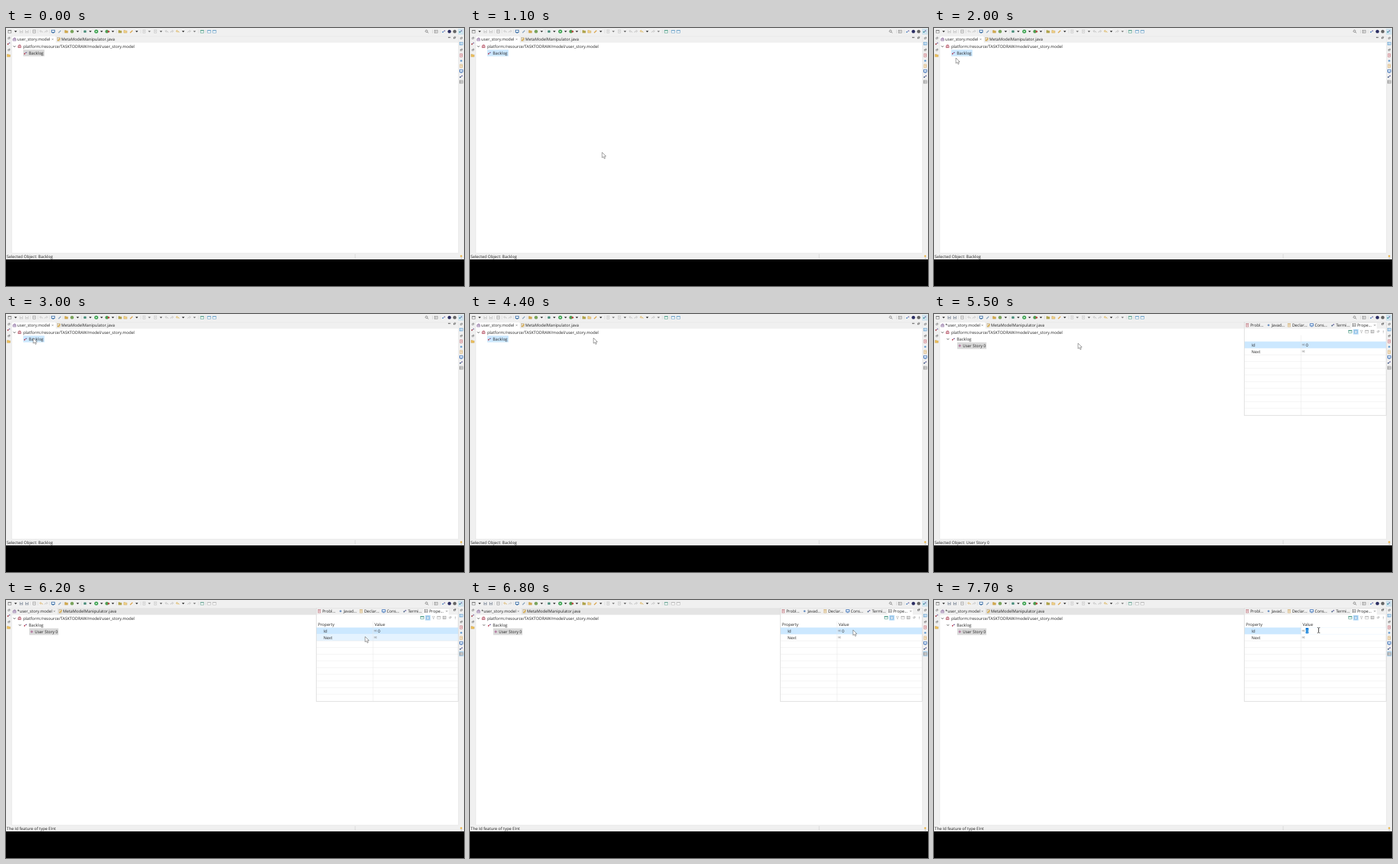
Recreate the animation shown at these times as an HTML page. Size 690x388 px, loop 8 s.

```html
<!DOCTYPE html>
<html lang="en">
<head>
<meta charset="utf-8">
<title>Model editor</title>
<style>
  html, body { margin: 0; width: 100%; height: 100%; overflow: hidden; background: #000; }
  svg { display: block; width: 100%; height: 100%; }
  text { font: 6.15px "Open Sans", "Noto Sans", sans-serif; fill: #222; text-rendering: geometricPrecision; white-space: pre; }
</style>
</head>
<body>
<svg id="stage" viewBox="0 0 690 388"></svg>
<script>
const LOOP = 8000;
const ADDED = 5300, OPENED = 5500, ACTIVE = 5600, EDIT = 7200;
const BAR = '#f0f0f0', LINE = '#e0e0e0', SELECTED = '#cce8ff', HOVER = '#e5f3ff', UNFOCUSED = '#d9d9d9';

const rect = (x, y, w, h, fill, more = '') =>
  `<rect x="${x}" y="${y}" width="${w}" height="${h}" fill="${fill}" ${more}/>`;
const path = (d, stroke, width = 0.8, fill = 'none') =>
  `<path d="${d}" stroke="${stroke}" stroke-width="${width}" fill="${fill}"/>`;
const label = (x, y, s) => `<text x="${x}" y="${y}">${s}</text>`;
const during = (from, to, body) => `<g data-from="${from}" data-to="${to}">${body}</g>`;

// Small icons, drawn around their own centre
const shapes = {
  window: c => rect(-2.6, -2.2, 5.2, 4.4, '#fff', `stroke="${c}" stroke-width=".8"`) + rect(-2.6, -2.2, 5.2, 1.3, c),
  floppy: c => rect(-2.6, -2.6, 5.2, 5.2, c) + rect(-1.5, -2.4, 3, 1.8, '#fff') + rect(-1.3, .8, 2.6, 1.6, '#eee'),
  drop: c => path('M-2.2-1.1H2.2L0 1.4Z', 'none', 0, c),
  dot: c => `<circle r="2.8" fill="${c}"/>`,
  small: c => `<circle r="1.7" fill="${c}"/>`,
  play: c => `<circle r="3.1" fill="${c}"/>` + path('M-.9-1.5L1.6 0L-.9 1.5Z', 'none', 0, '#fff'),
  bug: c => `<ellipse rx="1.8" ry="2.3" fill="${c}"/>` + path('M-2.8-1.8L2.8 1.8M2.8-1.8L-2.8 1.8M-3 0H3', c, .5),
  folder: c => path('M-2.8 2.2V-2H-.6L0-1.2H2.4V2.2Z', '#c09a50', .5, c),
  pen: c => path('M-2.2 2.2L1.8-1.8', c, 1.6),
  back: c => path('M2.6 1.6Q2.4-.8-1-.6M-.4-2.6L-2.4-.6L-.4 1.4', c, 1),
  forth: c => path('M-2.6 1.6Q-2.4-.8 1-.6M.4-2.6L2.4-.6L.4 1.4', c, 1),
  table: c => rect(-2.6, -2.3, 5.2, 4.6, '#fff', `stroke="${c}" stroke-width=".7"`) + path('M-2.6-.7H2.6M-2.6 .8H2.6M-.6-2.3V2.3', c, .5),
  screen: c => rect(-2.6, -2.3, 5.2, 3.6, '#e8f1fb', `stroke="${c}" stroke-width="1"`) + path('M-1.5 2.4H1.5', c, .9),
  page: c => rect(-2, -2.6, 4, 5.2, '#fff', `stroke="${c}" stroke-width=".7"`) + path('M-1.1-1H1.1M-1.1.5H1.1', c, .7),
  restore: c => rect(-1.3, -.8, 2.4, 2, 'none', `stroke="${c}" stroke-width=".6"`) + path('M-.3-1.8H1.9V.3', c, .6),
  links: c => path('M-2.2 1.3L1.8-1.5', c, .8) + rect(-2.5, -.1, 2, 2, c) + rect(.4, -2, 1.9, 1.9, '#8478b0'),
  model: c => rect(-2.3, -.6, 4.6, 2.9, '#fff', `stroke="${c}" stroke-width=".9"`) + path('M-1-.6V-2.4H1.4V-.6M-1 1H1', c, .8),
  gem: c => path('M0-2.2L2.2 0L0 2.2L-2.2 0Z', c, .4, '#c9a3bd') + path('M-1 0H1M0-1V1', c, .7),
  search: c => path('M.8.8L2.6 2.6M1.2-.6A1.8 1.8 0 1 1 1.2-.7', c, .8),
  cross: c => path('M-1.4-1.4L1.4 1.4M1.4-1.4L-1.4 1.4', c, .6),
  open: c => path('M-1.9-.9L0 1L1.9-.9', c, .9),
  filter: c => path('M-2.2-2H2.2L.5.3V2.4L-.5 1.8V.3Z', c, .5),
  dots: c => path('M0-2V-1.2M0-.4V.4M0 1.2V2', c, .8),
  field: c => path('M-2.4-1H-.8M-2.4.6H-.8M0-1.2H2.4M0 .8H2.4M0-1.2V.8', c, .6),
  sep: c => path('M0-3V3', c, .5)
};
const icon = (kind, x, y, color) => `<g transform="translate(${x} ${y}) scale(.9)">${shapes[kind](color)}</g>`;
// Each entry reads "kind position colour"
const entries = list => list.trim().split(/\s*,\s*/).map(e => e.split(' '));
const row = (y, list) => entries(list).map(([k, x, c]) => icon(k, x, y, c)).join('');
const column = (x, list) => entries(list).map(([k, y, c]) => icon(k, x, y, c)).join('');

const frame = rect(0, 0, 690, 348, BAR) + rect(9, 22, 672.5, 316.5, '#fff') +
  path('M8.7 338.6V12.3H681.6V338.6Z', LINE, .5) + path('M526 340V347', '#ccc', .6);

const toolbar = row(5.3, `window 5.5 #777, drop 14.5 #222, sep 36.5 #ccc, page 42.5 #8a8a8a, sep 48 #ccc,
  sep 65.5 #ccc, screen 71 #3d6fa5, pen 81 #8da6bd, sep 86 #ccc, folder 91 #d1a94d, dot 99.5 #79a35c, drop 108 #222,
  sep 113.5 #ccc, bug 119 #438a77, drop 127 #222, play 136 #35a04a, drop 144 #222, dot 152 #4d9f52, small 154.5 #b64c42,
  drop 161 #222, sep 166.5 #ccc, folder 172 #a9a548, folder 180 #f0cf86, pen 189 #dba64d, drop 197 #222, sep 203 #ccc,
  page 208 #b8b8b8, drop 216 #777, page 225 #b8b8b8, drop 233.5 #555, back 242 #bbb, forth 250 #bbb, back 258.5 #d9aa3f,
  drop 267 #222, forth 276 #bbb, drop 284 #777, sep 290 #ccc, sep 301 #ccc,
  search 634 #555, sep 642.5 #bbb, table 648 #888, sep 654 #ccc, links 659.5 #5e8fc5, dot 668 #2c2f63, dot 676 #666`) +
  rect(681, 1, 8.5, 9, '#cfe3ee') + icon('links', 685, 5.3, '#3c8c9b') +
  during(0, ADDED, row(5.3, 'floppy 23 #c6c6c6, floppy 31.5 #c6c6c6')) +
  during(ADDED, LOOP, row(5.3, 'floppy 23 #8c96a3, floppy 31.5 #8c96a3')) +
  during(0, ACTIVE, row(5.3, 'back 53 #c0c0c0, forth 60.5 #c0c0c0, window 295.5 #54a08a, window 306 #6fa3c8, window 314 #6fa3c8')) +
  during(ACTIVE, LOOP, row(5.3, 'back 53 #d8ad5a, forth 60.5 #c0c0c0, window 295.5 #6da696, window 306 #bbb, window 314 #bbb'));

const sidebars =
  column(4.2, 'restore 15.5 #666, links 23.5 #a8424a, restore 33 #666, folder 41.3 #ecbe59') +
  during(ACTIVE, LOOP, rect(682.5, 76.8, 7, 8, '#b9dcf5')) +
  column(685.8, `restore 15.5 #666, table 23.6 #5b9bcd, restore 33 #666, page 41.2 #bd5660, small 49.3 #6b9fd1,
    page 57.2 #d09a45, screen 65 #3a6eb5, links 73 #36507f, table 81 #777, small 343 #e9b44c`) +
  path('M685 346.2H686.6', '#888', .8);

const editorTabs = (title, shift) =>
  icon('model', 12.8, 17, '#8a6a9e') + label(17, 19.2, title) + icon('cross', 70.3 + shift, 16.9, '#777') +
  icon('page', 79.3 + shift, 16.8, '#b69a63') + icon('pen', 80.1 + shift, 17.2, '#d7a841') +
  label(83.2 + shift, 19.2, 'MetaModelManipulator.java');
const tabShape = (width, fill) => path(`M9 22.3V14Q9 12.5 10.5 12.5H${7.5 + width}Q${9 + width} 12.5 ${9 + width} 14V22.3Z`, 'none', 0, fill);

// The strip turns grey once the properties view takes the focus
const tabs = during(0, ADDED, tabShape(66, '#fff')) + during(ADDED, ACTIVE, tabShape(68.5, '#fff')) +
  during(ACTIVE, LOOP, rect(9, 12.5, 458, 9.8, '#e4e4e4') + tabShape(68.5, BAR)) +
  during(0, ADDED, editorTabs('user_story.model', 0)) +
  during(ADDED, LOOP, editorTabs('*user_story.model', 2.5)) +
  during(0, OPENED, path('M666 14.2H669.6', '#444', 1) + icon('restore', 675.5, 14.8, '#444'));

const tree = icon('open', 12.7, 27.6, '#333') + icon('model', 20.3, 27.5, '#b2485c') +
  label(26, 29.8, 'platform:/resource/TASKTODRAW/model/user_story.model') +
  during(0, 800, rect(26, 32.6, 32, 9.9, UNFOCUSED)) +
  during(800, ADDED, rect(26, 32.6, 32, 9.9, SELECTED)) +
  icon('links', 29.3, 37.9, '#b8475a') + label(34.3, 39.9, 'Backlog') +
  during(ADDED, LOOP, icon('open', 21, 37.6, '#333') + rect(35, 42.6, 44, 10, UNFOCUSED) +
    icon('gem', 38.8, 47.7, '#a05c86') + label(43.2, 49.9, 'User Story 0'));

const status = during(0, ADDED, label(1, 345.9, 'Selected Object: Backlog')) +
  during(ADDED, ACTIVE, label(1, 345.9, 'Selected Object: User Story 0')) +
  during(ACTIVE, LOOP, label(1, 345.9, 'The Id feature of type EInt'));

const viewTabs = [
  ['page', 472, '#b5606a', 'Probl...'], ['small', 504, '#6a8fc0', 'Javad...'], ['page', 535, '#c69a4c', 'Declar...'],
  ['screen', 569, '#3a6eb5', 'Cons...'], ['links', 601, '#3f5a80', 'Termi...'], ['table', 633, '#777', 'Prope...']
].map(([kind, x, color, name]) => icon(kind, x, 16.7, color) + label(x + 4.4, 19.1, name)).join('');

const grid = Array.from({ length: 9 }, (_, i) => `M468 ${(61.5 + i * 10.05).toFixed(2)}H681`).join('');

const properties = during(OPENED, LOOP,
  rect(467.4, 12.3, 213.8, 140.2, '#fff', 'stroke="#d2d2d2" stroke-width=".7"') +
  rect(467.8, 12.7, 161, 9.4, BAR) + rect(667, 12.7, 13.8, 9.4, BAR) +
  viewTabs + icon('cross', 664, 16.7, '#777') + icon('restore', 675.8, 15, '#444') +
  rect(631.5, 22.9, 8, 7.8, '#b5dbf7') +
  row(26.6, 'window 627 #57a08e, page 635.5 #5c9bd0, filter 644 #999, window 652 #bbb, table 660.5 #999, restore 669 #999, dots 677 #555') +
  during(ACTIVE, LOOP, label(470, 38.5, 'Property') + label(555.3, 38.5, 'Value')) +
  rect(468, 41.4, 213, 10.1, SELECTED) +
  during(6200, 6600, rect(468, 51.5, 213, 10, HOVER)) +
  during(EDIT, LOOP, rect(553, 41.4, 128, 10.1, '#fff')) +
  path(grid, '#ebebeb', .6) + path('M553 32V152', '#e6e6e6', .6) +
  label(478.3, 48.7, 'Id') + label(478.3, 58.8, 'Next') +
  icon('field', 556.6, 46.4, '#777') + icon('field', 556.6, 56.4, '#777') +
  during(OPENED, EDIT, label(560.2, 48.7, '0')) +
  during(EDIT, LOOP, rect(560, 42, 4.2, 8.2, '#0078d7') + '<text x="560.3" y="48.7" style="fill:#fff">0</text>') +
  during(EDIT, 7700, path('M563.6 42.2V50', '#111', .7)));

const pointer = '<g id="pointer">' +
  during(0, EDIT, path('M0 0V8.2L1.9 6.5L3.3 9.5L4.7 8.9L3.4 6H6Z', '#555', .6, '#fff')) +
  during(EDIT, LOOP, path('M-2-4Q0-4 0-3.2V3.2Q0 4 -2 4M2-4Q0-4 0-3.2V3.2Q0 4 2 4', '#333', .8)) + '</g>';

const stage = document.getElementById('stage');
stage.innerHTML = frame + toolbar + sidebars + tabs + tree + properties + status + pointer;

// Runs of pointer steps: start time, then one position every 100 ms
const runs = [
  [800, [424, 333], [370, 298], [284, 240], [199, 187], [159, 141]],
  [1400, [60, 84], [0, 52]],
  [1800, [8, 51], [22, 49], [33, 45], [41, 40], [46, 36], [41, 36]],
  [3200, [43, 37], [48, 39], [54, 40], [57, 40]],
  [4100, [68, 39], [105, 37], [150, 35], [186, 36], [201, 38], [210, 41], [215, 43], [217, 44]],
  [5600, [244, 44], [330, 42], [440, 36], [535, 28], [582, 22], [594, 20], [541, 55]],
  [6500, [548, 53], [560, 49], [572, 46], [577, 45]],
  [EDIT, [579.5, 45.5]]
];
const steps = runs.flatMap(([start, ...points]) => points.map((p, i) => [start + i * 100, ...p]));
const timed = [...stage.querySelectorAll('[data-from]')];
const cursor = document.getElementById('pointer');

function draw() {
  const t = performance.now() % LOOP;
  for (const g of timed) g.style.display = t >= +g.dataset.from && t < +g.dataset.to ? '' : 'none';
  const now = steps.findLast(s => s[0] <= t);
  cursor.style.display = now ? '' : 'none';
  if (now) cursor.setAttribute('transform', `translate(${now[1]} ${now[2]})`);
  requestAnimationFrame(draw);
}
draw();
</script>
</body>
</html>
```
